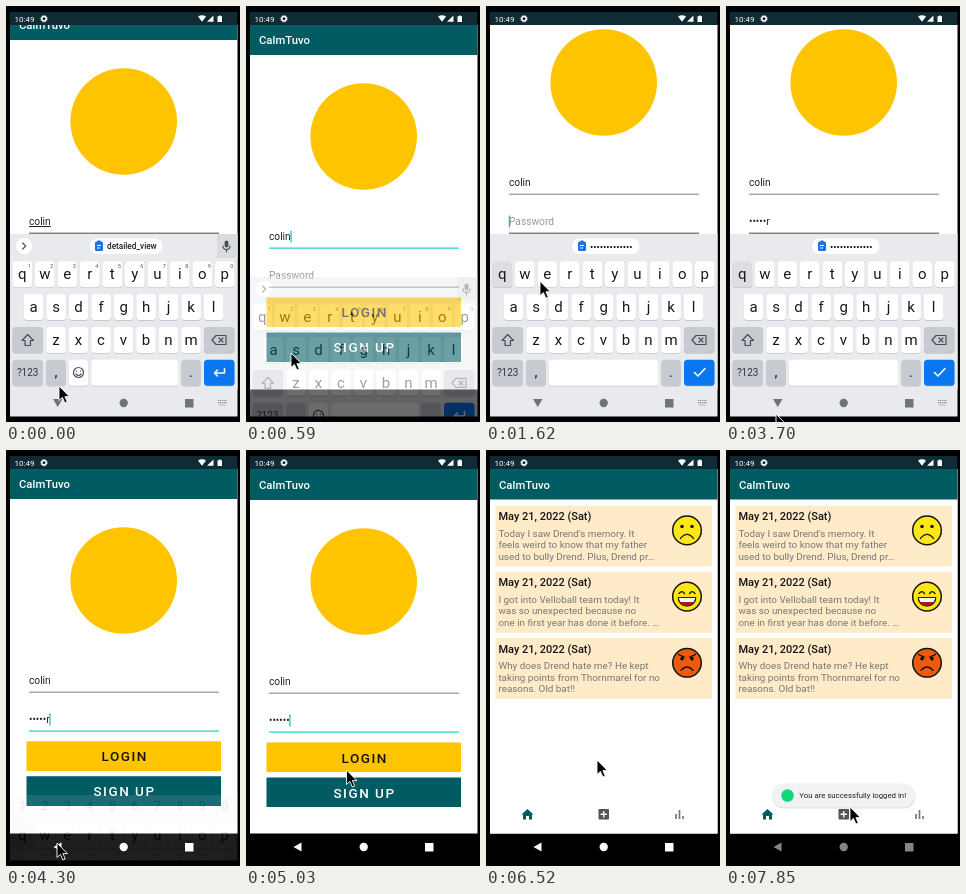
Recreate the animation shown at these times as an HTML page. Size 234x416 px, loop 7990 ms.

```html
<!DOCTYPE html>
<html lang="en">
<head>
<meta charset="utf-8">
<title>Login demo</title>
<style>
  html, body { margin: 0; width: 100%; height: 100%; overflow: hidden; background: #000; }
  svg { display: block; width: 100%; height: 100%; font-family: Roboto, "Noto Sans", sans-serif; }
  text { white-space: pre; }
  .mid { text-anchor: middle; }
  .bar { font-size: 11.3px; font-weight: 500; fill: #fff; }
  .field { font-size: 10.2px; fill: #222; }
  .btn { font-size: 13.5px; font-weight: 500; letter-spacing: 1.5px; }
  .key { font-size: 15px; fill: #17191c; }
  .small { font-size: 10px; fill: #33363a; }
  .sup { font-size: 5.5px; fill: #55585c; }
  .digit { font-size: 12px; fill: #33363a; }
  .chip { font-size: 8.2px; font-weight: 500; fill: #222; }
  .day { font-size: 11px; font-weight: 500; fill: #151515; }
  .note { font-size: 9.9px; fill: #777; }
  .toast { font-size: 7.8px; fill: #222; }
  .line { fill: none; stroke: #4b4f54; stroke-width: 1.2; stroke-linejoin: round; stroke-linecap: round; }
  .ink { fill: none; stroke: #151515; stroke-width: 1.4; stroke-linecap: round; }
</style>
</head>
<body>
<svg viewBox="0 0 234 416" preserveAspectRatio="none">
  <defs>
    <clipPath id="screenClip"><path d="M4 6H231.500V410.500H4Z"/></clipPath>
    <clipPath id="pageClip"><path d="M4 19H232V383.400H4Z"/></clipPath>
  </defs>
  <path fill="#000" d="M0 0H234V416H0Z"/>

  <g clip-path="url(#screenClip)">
    <g clip-path="url(#pageClip)">
      <path fill="#fff" d="M4 19H232V384H4Z"/>
      <g id="login">
        <path fill="#005b62" d="M4 19H232V50H4Z"/>
        <text class="bar" x="13" y="39">CalmTuvo</text>
        <circle cx="117.7" cy="131.5" r="53.3" fill="#ffc400"/>
        <text class="field" id="user" x="23" y="235">colin</text>
        <path id="userLine" d="M23 243.2H213"/>
        <text class="field" id="pass" x="23" y="274"></text>
        <path id="passLine" d="M23 282.2H213"/>
        <path id="caret" stroke="#03c5b2" stroke-width="1.2" d="M0 0V12"/>
        <path fill="#ffc400" d="M20.500 292.400H215V322H20.500Z"/>
        <path id="press" fill="#000" opacity="0" d="M20.500 292.400H215V322H20.500Z"/>
        <text class="btn mid" x="118.7" y="312.5" fill="#111">LOGIN</text>
        <path fill="#005b62" d="M20.500 327.400H215V357H20.500Z"/>
        <text class="btn mid" x="118.5" y="347.5" fill="#fff">SIGN UP</text>
      </g>
      <g id="home">
        <path fill="#fff" d="M4 19H232V384H4Z"/>
        <path fill="#005b62" d="M4 19H232V49.500H4Z"/>
        <text class="bar" x="13" y="39">CalmTuvo</text>
        <g id="cards"></g>
        <path fill="#005b62" d="M35.500 364.500L41.500 359L47.500 364.500H46V369.500H43V366H40V369.500H37V364.500Z"/>
        <rect x="112.5" y="359" width="10.5" height="10.5" rx="1" fill="#555"/>
        <path stroke="#fff" stroke-width="1.3" d="M114.500 364.250H121M117.750 361V367.500"/>
        <path stroke="#777" stroke-width="1.7" d="M190 369V364M193.500 369V360M197 369V366"/>
      </g>
    </g>

    <path fill="#0f2c34" d="M4 6H232V19H4Z"/>
    <text x="8.5" y="15.6" font-size="8.1" fill="#fff">10:49</text>
    <circle cx="38" cy="12.8" r="2.2" fill="none" stroke="#fff" stroke-width="1.5"/>
    <circle cx="38" cy="12.8" r="3.2" fill="none" stroke="#fff" stroke-dasharray="1.25"/>
    <path fill="#fff" d="M192 10.500Q196 8 200 10.500L196 15.800ZM201 15.800L207.500 9.500V15.800ZM211.500 10.300H213V9.500H214.500V10.300H216V16H211.500Z"/>

    <g id="board"></g>

    <g id="toast">
      <rect x="46" y="334.5" width="143.5" height="24" rx="12" fill="#000" opacity=".13"/>
      <rect x="46" y="333.5" width="143" height="24" rx="12" fill="#f1f2f3"/>
      <circle cx="61.5" cy="345.5" r="6.3" fill="#14d67b"/>
      <text class="toast" x="73.3" y="348.2">You are successfully logged in!</text>
    </g>

    <g id="nav">
      <path id="back"/>
      <circle cx="117.7" cy="397" r="4.2"/>
      <path d="M179 393H187.500V401.500H179Z"/>
    </g>
    <path id="ime" fill="none" stroke="#85888c" stroke-width="1.2" stroke-dasharray="1.3 .8" d="M212 394.500H221M212 396.700H221M213.500 399H219.500"/>
  </g>

  <path id="mouse" fill="#000" stroke="#fff" stroke-width=".9" d="M0 0V14.500L3.400 11.400L5.900 17L8.300 16L5.900 10.600H10.400Z"/>
</svg>

<script>
const LOOP = 7990, STEP = LOOP / 54;
const $ = id => document.getElementById(id);

// Markup helpers
const label = (cls, x, y, s) => `<text class="${cls}" x="${x}" y="${y}">${s}</text>`;
const box = (x, y, w, h, r, fill) =>
  `<rect x="${x}" y="${y}" width="${w}" height="${h}" rx="${r}" fill="${fill}"/>`;
const keycap = (x, row, w, fill = '#fff') => {
  const y = 255.3 + row * 32.8;
  return box(x, y + 0.8, w, 26, 3.5, '#c4c7cb') + box(x, y, w, 26, 3.5, fill);
};
const icon = d => `<path class="line" d="${d}"/>`;
const clipboard = x => box(x, 235.5, 8, 9.5, 1.5, '#1a73e8') + box(x + 2.3, 234.5, 3.4, 2.2, 0.8, '#1a73e8') +
  `<path stroke="#fff" d="M${x + 2} 239.5h4M${x + 2} 242h3"/>`;

function buildBoard() {
  const pitch = 22.5, grey = '#c7cbd1';
  let s = box(4, 228, 228, 190, 0, '#e8eaed');
  let sups = '', digits = '';
  ['qwertyuiop', 'asdfghjkl', 'zxcvbnm'].forEach((row, r) => {
    const first = [16.3, 27.6, 50][r];
    [...row].forEach((c, i) => {
      const x = first + i * pitch;
      s += keycap(x - 9.8, r, 19.6) + (c === 'q' ? '<g id="held">' + keycap(x - 9.8, 0, 19.6, '#dcdee1') + '</g>' : '');
      s += label('key mid', x, 273.3 + r * 32.8, c);
      if (!r) {
        const n = (i + 1) % 10;
        sups += label('sup mid', x + 7, 262, n);
        digits += label('digit mid', x, 243.5, n);
      }
    });
  });
  s += keycap(6.5, 2, 30.5, grey) + icon('M21.700 328.500L16 334.500H19V339.500H24.500V334.500H27.500Z');
  s += keycap(198, 2, 30.5, grey) + icon('M206 334L210 329.500H220V338.500H210ZM213 332L217 336M217 332L213 336');
  s += keycap(6.5, 3, 30.5, grey) + label('small mid', 21.7, 370.3, '?123');
  s += keycap(40.2, 3, 19.6, grey) + label('key mid', 50, 371, ',');
  s += keycap(175.2, 3, 19.6, grey) + label('key mid', 185, 371, '.');
  s += keycap(198, 3, 30.5, '#0b76ef');
  s += '<g id="nameKeys">' + sups + keycap(62.7, 3, 19.6) + keycap(85.2, 3, 87.3) +
    '<circle class="line" cx="72.5" cy="366.5" r="5"/>' + icon('M70.500 365V365.200M74.500 365V365.200M70 368Q72.500 371 75 368') +
    '<path class="line" style="stroke:#fff;stroke-width:1.5" d="M218.500 362.500V367H208.500M211.500 364L208.500 367L211.500 370"/>' +
    box(211, 228, 21, 24, 0, '#d9dbdf') +
    '<circle cx="18" cy="240" r="8" fill="#fff"/>' + icon('M16.700 237L19.700 240L16.700 243') +
    box(218.6, 234.5, 3.8, 7, 1.9, '#4b4f54') + icon('M217 240Q217 243.500 220.500 243.500T224 240M220.500 243.500V246') + '</g>';
  s += '<g id="nameChip">' + box(84, 232.5, 72.5, 15.5, 7.75, '#fff') + clipboard(89) +
    label('chip', 101, 243, 'detailed_view') + '</g>';
  s += '<g id="passKeys">' + keycap(62.7, 3, 109.8) +
    '<path class="line" style="stroke:#fff;stroke-width:1.6" d="M208.500 366.500L212 370L219 362.500"/></g>';
  s += '<g id="passChip">' + box(86, 232.5, 67.5, 15.5, 7.75, '#fff') + clipboard(92) +
    `<text x="104" y="243.5" font-size="9.7">${'•'.repeat(13)}</text></g>`;
  s += '<g id="digits">' + digits + '</g>';
  $('board').innerHTML = s;
}

function buildCards() {
  const notes = [
    ["Today I saw Drend's memory. It", 'feels weird to know that my father', 'used to bully Drend. Plus, Drend pr…'],
    ['I got into Velloball team today! It', 'was so unexpected because no', 'one in first year has done it before. …'],
    ['Why does Drend hate me? He kept', 'taking points from Thornmarel for no', 'reasons. Old bat!!']
  ];
  const eyes = '<circle cx="-5" cy="-4" r="1.7"/><circle cx="5" cy="-4" r="1.7"/>';
  const faces = [
    eyes + '<path class="ink" d="M-6.500 8Q0 0 6.500 8"/>',
    '<path class="ink" d="M-8 -3Q-5 -7 -2.500 -3M2.500 -3Q5 -7 8 -3"/>' +
      '<path d="M-9 1H9Q8 9.500 0 9.500T-9 1Z" fill="#a51c1c" stroke="#151515"/><path d="M-8.300 1.500H8.300L6.500 5.500H-6.500Z" fill="#fff"/>',
    eyes + '<path class="ink" d="M-8.500 -8.500L-2.500 -5.500M8.500 -8.500L2.500 -5.500M-6 7.500Q0 1 6 7.500"/>'
  ];
  $('cards').innerHTML = notes.map((lines, i) =>
    `<g transform="translate(0 ${i * 66.2})">` + box(9.4, 55.5, 216.6, 61, 1, '#ffebc8') +
    label('day', 12.4, 70.2, 'May 21, 2022 (Sat)') +
    lines.map((l, n) => label('note', 12.4, 86.6 + n * 11.6, l)).join('') +
    `<g transform="translate(201 80.4)"><circle r="14.3" fill="${i < 2 ? '#ffe614' : '#ee5a0c'}" stroke="#151515" stroke-width="1.5"/>` +
    faces[i] + '</g></g>').join('');
}

// Tracks: rows of [ms, value, ...], linear in between
const PAN = [[0, -16], [450, -16], [592, -1], [740, 0], [1331, 0], [1480, -35], [1627, -55], [4143, -55], [4291, -1], [4439, 0]];
const BOARD = [[0, 0, 1], [450, 0, 1], [592, 43, .42], [740, 130, 0], [1331, 130, 0], [1480, 50, .5],
  [1627, 0, 1], [4143, 0, 1], [4291, 117, .12], [4439, 183, 0]];
const MOUSE = [[0, 53, 380], [296, 51, 394], [445, 50, 390], [592, 45, 347], [740, 46, 315], [888, 51, 285],
  [1184, 54, 275], [1627, 54, 275], [1776, 53, 320], [1924, 52, 375], [2071, 50, 420],
  [3551, 50, 420], [3699, 50, 408], [3847, 51, 393], [4291, 51, 393], [4587, 66, 368],
  [4883, 92, 328], [5179, 109, 312], [5326, 111, 310], [7546, 111, 310], [7694, 116, 328], [7842, 124, 357]];
const HOME = [[6066, 0, 24], [6214, .5, 12], [6362, 1, 0]];
const TOAST = [[6510, 0], [6954, 1]];
const TYPED = [2060, 2510, 2660, 2810, 2960, 3250];
const WORD = 'silver', MASK_AT = 4740;
const SLACK = 12; // event times are rounded against the sampling step

function at(track, t) {
  const i = track.findIndex(row => row[0] > t);
  if (i < 0) return track[track.length - 1].slice(1);
  if (!i) return track[0].slice(1);
  const a = track[i - 1], b = track[i], k = (t - a[0]) / (b[0] - a[0]);
  return a.slice(1).map((v, n) => v + (b[n + 1] - v) * k);
}
const past = (t, ms) => t >= ms - SLACK;
const within = (t, a, b) => past(t, a) && !past(t, b);
const show = (id, on) => { $(id).style.display = on ? '' : 'none'; };
const move = (id, x, y) => $(id).setAttribute('transform', `translate(${x} ${y})`);
const line = (id, focus, open) => {
  $(id).setAttribute('stroke', focus ? (open ? '#444' : '#1ed3c1') : '#808080');
  $(id).setAttribute('stroke-width', focus && !open ? 1.3 : 1);
};

function draw(t) {
  const [drop, alpha] = at(BOARD, t), open = alpha === 1;
  const onPass = past(t, 1320);
  move('login', 0, at(PAN, t)[0]);
  move('board', 0, drop);
  $('board').style.opacity = alpha;

  show('nameKeys', t < 1000);
  show('nameChip', t < 500);
  show('passKeys', t > 1000);
  show('held', t > 1000);
  show('passChip', within(t, 1000, 4300));
  show('digits', past(t, 4300));

  const count = TYPED.filter(ms => past(t, ms)).length;
  const masked = !count || past(t, MASK_AT);
  const pass = $('pass');
  pass.textContent = !count ? 'Password'
    : '•'.repeat(masked ? count : count - 1) + (masked ? '' : WORD[count - 1]);
  pass.style.fill = count ? '#222' : '#999';
  $('user').style.textDecoration = past(t, 450) ? 'none' : 'underline';
  line('userLine', !onPass, open);
  line('passLine', onPass, open);

  const width = !onPass ? $('user').getComputedTextLength() : count ? pass.getComputedTextLength() : 0;
  move('caret', 23.3 + width, onPass ? 264.5 : 225.5);
  show('caret', within(t, 450, 1030) || within(t, 1320, 3400) || within(t, 4300, 5620) || past(t, 6070));
  $('press').setAttribute('opacity', within(t, 5470, 5620) ? .12 : 0);

  const [fade, rise] = at(HOME, t);
  $('home').style.opacity = fade;
  move('home', 0, rise);
  $('toast').style.opacity = at(TOAST, t)[0];

  $('nav').setAttribute('fill', open ? '#6f7276' : past(t, 7410) ? '#858585' : '#fff');
  show('nav', !within(t, 590, 740));
  $('back').setAttribute('d', open ? 'M47 393H56.500L51.750 401Z' : 'M55.500 392.500V401.500L47.500 397Z');
  show('ime', open && !past(t, 4150));
  move('mouse', ...at(MOUSE, t));
}

function tick() {
  const now = performance.now() % LOOP;
  draw(Math.min(53, Math.floor((now + 10) / STEP)) * STEP);
  requestAnimationFrame(tick);
}

buildBoard();
buildCards();
tick();
</script>
</body>
</html>
```
